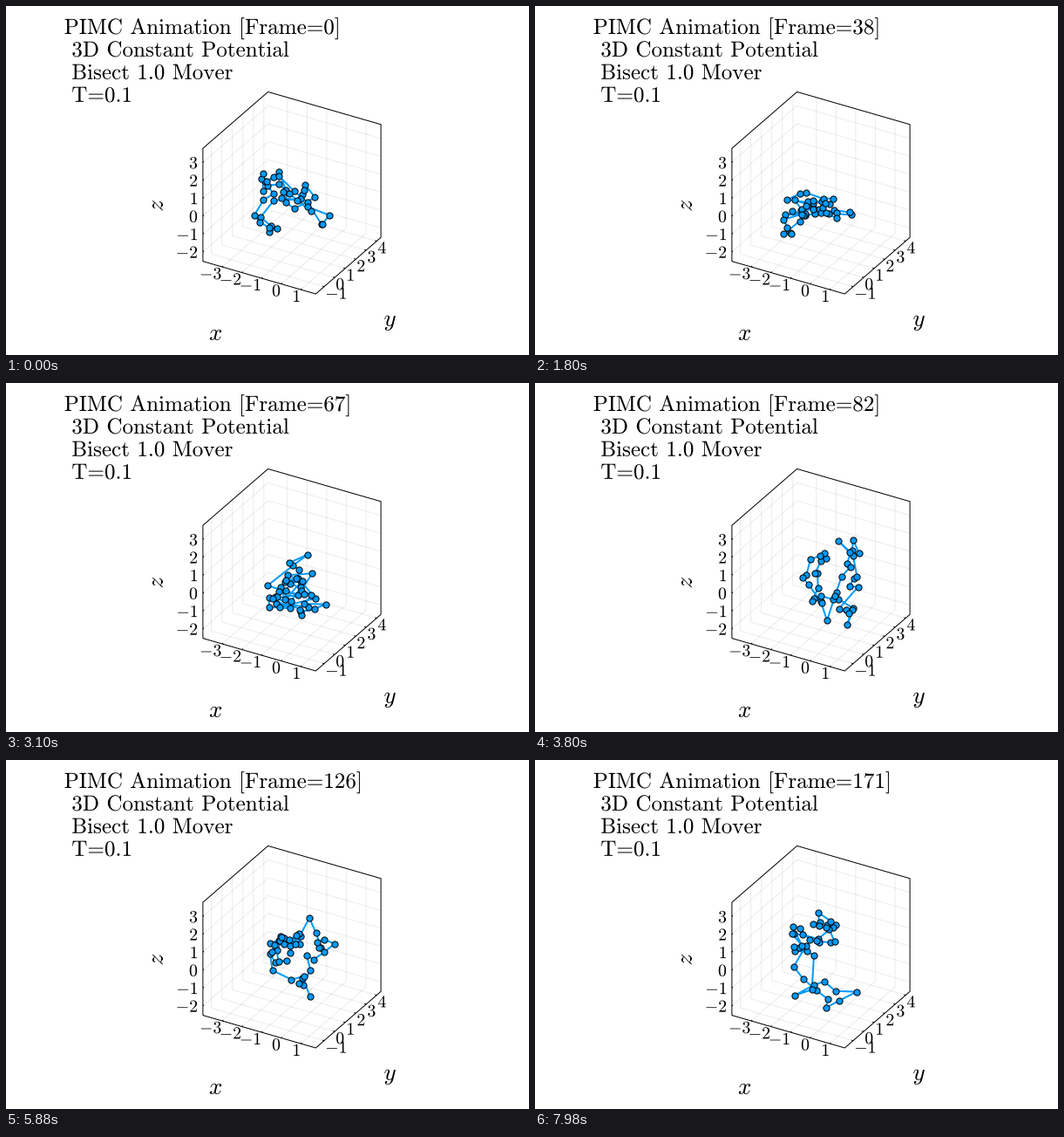
These frames come from a looping animation (600 px wide and 400 px high, 8 s). A matplotlib script:

```python
import math

import numpy as np
import matplotlib.pyplot as plt
from matplotlib.animation import FuncAnimation
from matplotlib.collections import LineCollection
from matplotlib.patches import PathPatch
from matplotlib.textpath import TextPath
from matplotlib.transforms import Affine2D

plt.rcParams["mathtext.fontset"] = "cm"

W, H, DPI = 600, 400, 100
PX = 72 / DPI                      # one pixel in points
TICK, LABEL, TITLE = 19.8, 27, 25.1
BLUE = "#009afa"
BEADS, SWEEPS, WINDOW = 40, 171, 16

fig = plt.figure(figsize=(W / DPI, H / DPI), dpi=DPI, facecolor="white")
ax = fig.add_axes([0, 0, 1, 1])
ax.set_xlim(0, W)
ax.set_ylim(H, 0)
ax.axis("off")


# ---- text as outlines, y pointing down ----
def roman(s):
    s = s.replace(" ", r"\hspace{0.38}")
    s = s.replace("=", r"\hspace{-0.2}=\hspace{-0.2}")
    return r"$\mathrm{" + s + "}$"


def outline(s, x, y, size, angle=0, right=False):
    path = TextPath((0, 0), s, size=size)
    if right:
        x -= path.get_extents().x1
    return path.transformed(
        Affine2D().rotate_deg(angle).scale(1, -1).translate(x, y))


def write(*args, **kw):
    patch = PathPatch(outline(*args, **kw), facecolor="black", lw=0)
    return ax.add_patch(patch)


# ---- unit cube seen from azimuth 30, elevation 30 ----
SIDE, CENTER = 149.5, (328, 214.2)
SIN, COS = 0.5, math.sqrt(3) / 2


def project(a, b, c):
    a, b, c = a - 0.5, b - 0.5, c - 0.5
    return np.array([CENTER[0] + SIDE * (COS * a + SIN * b),
                     CENTER[1] + SIDE * (SIN * (SIN * a - COS * b) - COS * c)])


def line(*corners):
    return [project(*p) for p in corners]


grid, marks = [], []

for v in range(-3, 2):
    a = (v + 3.98) / 5.74
    grid.append(line((a, 0, 0), (a, 1, 0), (a, 1, 1)))
    marks.append(line((a, 0, 0), (a, 0.015, 0)))
    x, y = project(a, 0, 0)
    write(roman(str(v)), x - 1.5, y + 14, TICK, right=True)

for v in range(-1, 5):
    b = (v + 1.8) / 6.2
    grid.append(line((1, b, 0), (0, b, 0), (0, b, 1)))
    marks.append(line((1, b, 0), (0.985, b, 0)))
    x, y = project(1, b, 0)
    write(roman(str(v)), x + 1.2, y + 14, TICK)

for v in range(-2, 4):
    c = (v + 2.53) / 6.31
    grid.append(line((0, 0, c), (0, 1, c), (1, 1, c)))
    marks.append(line((0, 0, c), (0, 0.015, c)))
    x, y = project(0, 0, c)
    write(roman(str(v)), x - 6.8, y + 7, TICK, right=True)

edges = line((0, 0, 0), (0, 0, 1), (0, 1, 1), (1, 1, 1),
             (1, 1, 0), (1, 0, 0), (0, 0, 0))
ax.add_collection(LineCollection(grid, colors=[(0, 0, 0, 0.08)],
                                 linewidths=PX, zorder=0.5))
ax.add_collection(LineCollection([edges] + marks, colors="black",
                                 linewidths=PX, zorder=0.6))

write("$x$", 233, 383, LABEL)
write("$y$", 433.5, 366.8, LABEL)
write("$z$", 180, 235.5, LABEL, angle=90)


def heading(n):
    return outline(roman(f"PIMC Animation [Frame={n}]"), 66.7, 32, TITLE)


title = ax.add_patch(PathPatch(heading(0), facecolor="black", lw=0))
for i, s in enumerate(["3D Constant Potential", "Bisect 1.0 Mover", "T=0.1"]):
    write(roman(s), 75.3, 58 + 26 * i, TITLE)

# ---- bead chain: closed random walk, one window redrawn per sweep ----
# sweep, then left, right, top and bottom of the bead cloud
SPREAD = np.array([
    (0, 285, 371, 190, 259),
    (25, 278, 364, 215, 268),
    (52, 293, 361, 213, 254),
    (82, 307, 372, 180, 277),
    (104, 309, 365, 180, 268),
    (146, 297, 387, 182, 273),
    (171, 295, 369, 175, 284),
])


def bridge(p, q, n, rng):
    """Random walk of n steps pinned to p and q."""
    t = np.linspace(0, 1, n + 1)[:, None]
    walk = np.vstack([[0, 0], rng.normal(size=(n, 2)).cumsum(axis=0)])
    return p + t * (q - p) + walk - t * walk[-1]


def fit(chain, n):
    """Scale the chain to the extent of the cloud at sweep n."""
    left, right, top, bottom = (np.interp(n, SPREAD[:, 0], SPREAD[:, k])
                                for k in range(1, 5))
    low, high = chain.min(axis=0), chain.max(axis=0)
    unit = (chain - low) / (high - low)
    return unit * (right - left, bottom - top) + (left, top)


def simulate():
    rng = np.random.default_rng(12)
    home = np.zeros(2)
    chain = bridge(home, home, BEADS, rng)[:-1]
    chains = [fit(chain, 0)]
    for n in range(1, SWEEPS + 1):
        idx = (rng.integers(BEADS) + np.arange(WINDOW + 1)) % BEADS
        chain[idx] = bridge(chain[idx[0]], chain[idx[-1]], WINDOW, rng)
        chains.append(fit(chain, n))
    return chains


chains = simulate()
beads, = ax.plot([], [], "-o", color=BLUE, lw=2 * PX, ms=7.2 * PX,
                 mec="black", mew=PX, zorder=3)


def sweep_at(tick):
    """Every three sweeps last 20, 100 and 20 ms."""
    k, r = divmod(tick, 7)
    return 3 * k + (r > 0) + (r > 5)


def update(tick):
    n = sweep_at(tick)
    beads.set_data(chains[n][:, 0], chains[n][:, 1])
    title.set_path(heading(n))
    return beads, title


anim = FuncAnimation(fig, update, frames=400, interval=20,
                     repeat=True, repeat_delay=0)
plt.show()
```
